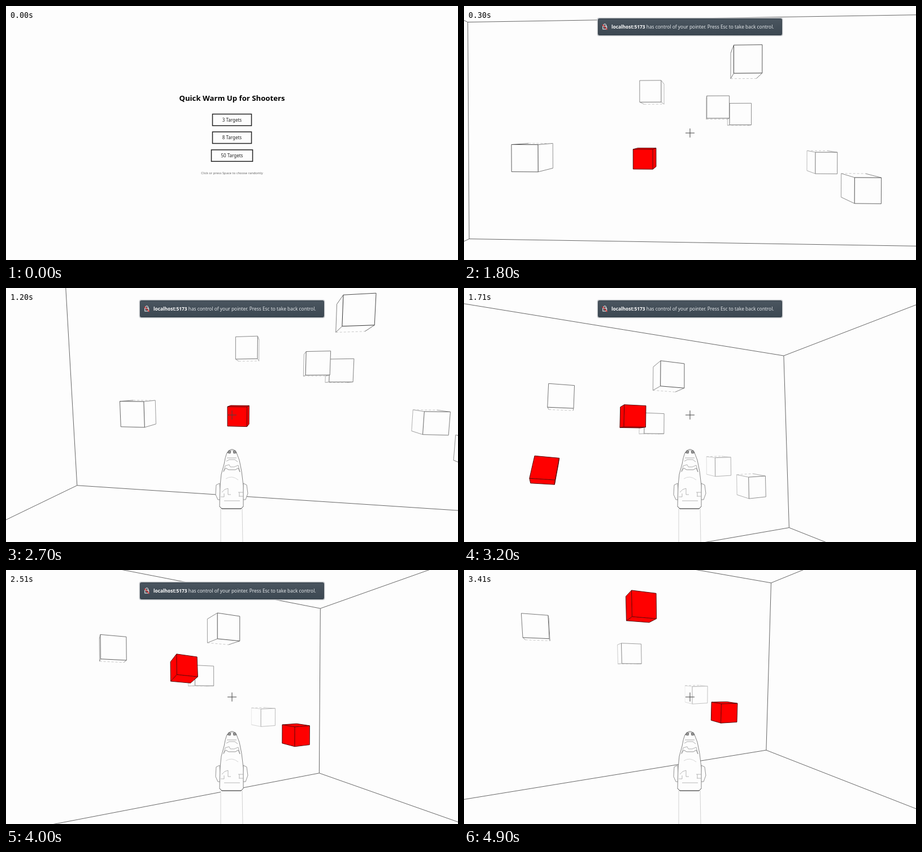
An HTML page with a canvas that plays this animation: 800x450 px, repeating every 5000 ms.

```html
<!DOCTYPE html>
<html lang="en">
<head>
<meta charset="utf-8">
<title>Quick Warm Up for Shooters</title>
<style>
  html, body { margin: 0; width: 100%; height: 100%; overflow: hidden; background: #fdfdfd; }
  canvas, svg { position: absolute; left: 0; top: 0; width: 800px; height: 450px; }
  text { font-family: "Noto Sans", "Open Sans", sans-serif; }
  #clock { font: 13.3px "DejaVu Sans Mono", monospace; }
  #menu { text-anchor: middle; font-size: 8px; fill: #222; }
  #menu rect { fill: none; stroke: #222; stroke-width: 1.5; }
  #menu .title { font-size: 13.2px; font-weight: 700; fill: #000; }
  #menu .hint { font-size: 5.82px; fill: #666; }
  #notice text { font-size: 8.37px; fill: #e4e8eb; }
</style>
</head>
<body>
<canvas id="scene" width="800" height="450"></canvas>
<svg viewBox="0 0 800 450">
  <defs>
    <linearGradient id="slate" x2="0" y2="1">
      <stop offset="0" stop-color="#4a555f"/><stop offset="1" stop-color="#3c4852"/>
    </linearGradient>
  </defs>
  <g id="menu">
    <text class="title" x="400" y="168">Quick Warm Up for Shooters</text>
    <rect x="365.5" y="191.5" width="69" height="20.5"/><text x="400" y="204.7">3 Targets</text>
    <rect x="365.5" y="223" width="69" height="20.5"/><text x="400" y="236.4">8 Targets</text>
    <rect x="363.5" y="254.8" width="73" height="20.5"/><text x="400" y="268.1">50 Targets</text>
    <text class="hint" x="400" y="298">Click or press Space to choose randomly</text>
  </g>
  <g id="notice">
    <rect x="235.5" y="20.5" width="329" height="33" rx="4" fill="#c9cccf"/>
    <rect x="237.5" y="22.5" width="325" height="29" rx="2" fill="url(#slate)" stroke="#36414a"/>
    <g fill="none" stroke="#fff">
      <path d="M247 36v-2a2.2 2.2 0 0 1 4.4 0v2"/><rect x="245.8" y="36" width="6.8" height="5"/>
      <path d="M245 33l8.5 9" stroke="#e33" stroke-width="1.3"/>
    </g>
    <text x="261" y="40"><tspan font-weight="700" fill="#fff">localhost:5173</tspan> has control of your pointer. Press Esc to take back control.</text>
  </g>
  <text id="clock" x="8" y="21">0.00s</text>
</svg>
<script>
const LOOP = 5000, START = 1500, STEP = 100;
const FOCAL = 482.5;
const ROOM = { left: -17.6, right: 17.2, h: 8.228, back: 20, near: -30 };
const $ = id => document.getElementById(id);
const ctx = $('scene').getContext('2d');

// time, x, z, yaw in degrees, pitch in radians
const CAMERA = [
  [1500, 0, 0, 0, 0],
  [1700, 0, 0, -1.2, -.004],
  [2000, 0, 0, -4.4, -.016],
  [2200, 0, 0, -5.05, -.018],
  [2600, -.6, 0, -9, -.075],
  [2800, -1.2, 0, -7.1, -.1],
  [3200, -2.05, -.17, 24.27, .089],
  [3600, -3.7, .5, 19.85, .0855],
  [3800, -3.7, .4, 22, .072],
  [4100, -3.1, -.1, 31, -.07],
  [4400, -2.3, -.6, 37.45, -.187],
  [4900, -1.5, -1.1, 25.55, -.102]
];

// front face centre; red from `on`, spinning from `hit`
const CUBES = [
  { p: [1.672, 2.546, 9.75], on: 4700 },
  { p: [-2.324, 1.83, 12.53] },
  { p: [.771, 1.062, 12.2], on: 2800, hit: 3700, tilt: .3, roll: -.8 },
  { p: [1.836, .776, 12.7] },
  { p: [-6.451, -1.005, 9.75] },
  { p: [-2.903, -1.43, 13.6], on: 0, hit: 2800, tilt: .36, roll: -.8 },
  { p: [5.821, -1.494, 12.87] },
  { p: [6.409, -2.295, 10.7], on: 3700, hit: 4700, tilt: .03, roll: -.8 }
];
const SPIN_LIFE = 1100;

// vertex bits: 1 = right, 2 = top, 4 = far
const FACES = [[0,1,3,2], [4,6,7,5], [0,2,6,4], [1,5,7,3], [0,4,5,1], [2,3,7,6]];

function cameraAt(t) {
  let i = 0;
  while (i < CAMERA.length - 2 && t >= CAMERA[i + 1][0]) i++;
  const a = CAMERA[i], b = CAMERA[i + 1], span = b[0] - a[0];
  const s = Math.min(1, (t - a[0]) / span);
  const slope = (j, k) => {
    const q = CAMERA[Math.max(0, j - 1)], r = CAMERA[Math.min(CAMERA.length - 1, j + 1)];
    return (r[k] - q[k]) / (r[0] - q[0]) * span;
  };
  const [x, z, yaw, pitch] = [1, 2, 3, 4].map(k => {
    const s2 = s * s, s3 = s2 * s;
    return a[k] * (2 * s3 - 3 * s2 + 1) + slope(i, k) * (s3 - 2 * s2 + s)
      + b[k] * (3 * s2 - 2 * s3) + slope(i + 1, k) * (s3 - s2);
  });
  const r = yaw * Math.PI / 180;
  return { x, z, sy: Math.sin(r), cy: Math.cos(r), sp: Math.sin(pitch), cp: Math.cos(pitch) };
}

function toView(c, [x, y, z]) {
  const dx = x - c.x, dz = z - c.z;
  const far = dx * c.sy + dz * c.cy;
  return [dx * c.cy - dz * c.sy, y * c.cp - far * c.sp, far * c.cp + y * c.sp];
}

const toScreen = ([x, y, z]) => [400 + FOCAL * x / z, 225 - FOCAL * y / z];

function trace(points, close) {
  ctx.beginPath();
  points.forEach(([x, y], i) => i ? ctx.lineTo(x, y) : ctx.moveTo(x, y));
  if (close) ctx.closePath();
}

function stroke(color, width = 1, dash = []) {
  ctx.strokeStyle = color;
  ctx.lineWidth = width;
  ctx.setLineDash(dash);
  ctx.stroke();
}

function line3d(c, p, q) {
  let a = toView(c, p), b = toView(c, q);
  const near = .05;
  if (a[2] < near && b[2] < near) return;
  if (a[2] < b[2]) [a, b] = [b, a];
  if (b[2] < near) {
    const s = (a[2] - near) / (a[2] - b[2]);
    b = a.map((v, i) => v + (b[i] - v) * s);
  }
  trace([toScreen(a), toScreen(b)]);
  stroke('#555', .9);
}

function drawRoom(c) {
  const { left, right, h, back, near } = ROOM;
  for (const y of [-h, h]) {
    line3d(c, [left, y, back], [right, y, back]);
    for (const x of [left, right]) line3d(c, [x, y, back], [x, y, near]);
  }
  for (const x of [left, right]) line3d(c, [x, -h, back], [x, h, back]);
}

function drawCube(c, cube, t) {
  const age = cube.hit && t >= cube.hit ? (t - cube.hit) / 1000 : 0;
  if (age * 1000 >= SPIN_LIFE) return;
  const red = t >= cube.on;
  const rx = age && cube.tilt * (1 - Math.exp(-8 * age)), rz = age && cube.roll * age * age;
  const view = [];
  for (let i = 0; i < 8; i++) {
    const x = (i & 1) - .5, y = (i >> 1 & 1) - .5, z = (i >> 2) - .5;
    const y1 = y * Math.cos(rx) - z * Math.sin(rx), z1 = y * Math.sin(rx) + z * Math.cos(rx);
    view.push(toView(c, [
      cube.p[0] + x * Math.cos(rz) - y1 * Math.sin(rz),
      cube.p[1] + x * Math.sin(rz) + y1 * Math.cos(rz),
      cube.p[2] + .5 + z1
    ]));
  }
  if (view.some(v => v[2] < .1)) return;
  const pts = view.map(toScreen), edges = new Map();
  FACES.forEach(face => {
    const q = face.map(i => pts[i]);
    const area = q.reduce((sum, [x, y], i) => {
      const [x2, y2] = q[(i + 1) % 4];
      return sum + x * y2 - x2 * y;
    }, 0);
    if (area >= 0) return;
    trace(q, true);
    ctx.fillStyle = !red ? '#fdfdfd' : age > .5 ? '#f92020' : '#ff0000';
    ctx.fill();
    face.forEach((a, i) => {
      const b = face[(i + 1) % 4], key = Math.min(a, b) * 8 + Math.max(a, b);
      edges.set(key, (edges.get(key) || 0) + 1);
    });
  });
  // outlines pale with distance
  const tone = Math.max(30, 30 + (view[0][2] - 9) * 20);
  const gray = add => `rgb(${[0, 0, 0].fill(Math.round(tone + add))})`;
  edges.forEach((count, key) => {
    const a = key >> 3, b = key & 7;
    trace([pts[a], pts[b]]);
    if (red) stroke('#400', .9);
    else if (!(a & 4) && !(b & 4)) stroke(gray(count > 1 ? 0 : 25), .9);
    else if ((a ^ b) === 4) stroke(gray(45), .8);
    else if ((a ^ b) === 2) stroke(gray(70), .8);
    else stroke('#bbb', .8, [4, 3]);
  });
}

function shape(d, color, width = .9, fill) {
  const path = new Path2D(d);
  if (fill) { ctx.fillStyle = fill; ctx.fill(path); }
  ctx.strokeStyle = color;
  ctx.lineWidth = width;
  ctx.setLineDash([]);
  ctx.stroke(path);
}

function gunSide() {
  shape('M664 290Q674 286 683 288L690 291L737 300L774 307L960 350V460H765L763 450L758 420L750 408L735 396L712 387L704 372L703 352L690 342L672 330L671 321L662 318Q658 303 664 290Z', '#333', .9, '#fdfdfd');
  shape('M668 290Q662 300 665 318M673 289L672 293L690 294M674 332L692 343L704 349', '#333', 1.2);
  shape('M716 333L717 342L726 345M728 337L727 346L756 354M734 355L736 365L730 383L723 378M748 365L742 378L736 386M704 372Q710 382 716 388', '#555');
  shape('M748 348L757 353L748 352ZM673 324L676 326L673 328Z', '#111', .8, '#111');
  shape('M772 355Q785 364 784 375Q783 390 779 402M697 304L762 318M731 340L766 349', '#bbb');
  for (let i = 0; i < 6; i++) {
    shape(`M${677 + i * 3.6} ${308 + i * .6}l3 14`, '#444');
    shape(`M${774 + i * 4.8} ${319 + i}l3 23`, '#777', .8);
  }
}

function gunRear() {
  shape('M380 391V451H419L418 391Z', '#ccc', .9, '#fdfdfd');
  shape('M378 346L372 349L371 366L375 375H381ZM420 346L426 349L428 364L424 375H419Z', '#888', .9, '#fdfdfd');
  shape('M391 292Q388 299 386 312L381 330L379 350L378 387L382 391H416L420 387V350L417 325L413 305L408 292L404 287H396Z', '#777', .9, '#fdfdfd');
  shape('M392 292L394 288L398 289L397 293ZM408 292L406 288L402 289L403 293Z', '#444', .7, '#999');
  shape('M396 287Q400 284 404 287', '#999', .8);
  shape('M390 307L395 304H405L410 308M391 301H408M388 315L395 313L397 317H404L411 314L414 326M388 315L385 326', '#999', .8);
  shape('M389 338Q400 331 411 340', '#ccc', .8);
  shape('M385 325L389 319L394 322H406L411 319L414 326', '#777', .8);
  shape('M382 362L387 357L393 355V366H398M380 370H386V364M411 362H420M412 369H420M413 362V369M386 377H414', '#999', .7);
  shape('M378 387L382 391H416L420 387', '#444', .9);
}

function drawGun(t) {
  if (t < 2100) return;
  ctx.save();
  if (t < 2300) {
    ctx.translate(t < 2200 ? 100 : 0, t < 2200 ? 20 : 0);
    gunSide();
  } else {
    const k = Math.max(0, (2500 - t) / 200);
    ctx.translate(45 * k * k, 20 * k * k);
    gunRear();
  }
  ctx.restore();
}

function drawCrosshair() {
  trace([[392, 225], [408, 225]]);
  stroke('#444');
  trace([[400, 217], [400, 233]]);
  stroke('#444');
}

function render(now) {
  const t = Math.floor(now % LOOP / STEP) * STEP;
  const playing = t >= START;
  $('menu').style.display = playing ? 'none' : '';
  $('notice').style.display = t >= 1700 && t < 4600 ? '' : 'none';
  $('clock').textContent = (Math.max(0, t - START) * 1.0035 / 1000).toFixed(2) + 's';
  ctx.fillStyle = '#fdfdfd';
  ctx.fillRect(0, 0, 800, 450);
  if (!playing) return;
  const cam = cameraAt(t);
  drawRoom(cam);
  [...CUBES].sort((a, b) => b.p[2] - a.p[2]).forEach(cube => drawCube(cam, cube, t));
  drawGun(t);
  drawCrosshair();
}

const begin = performance.now();
function tick() {
  render(performance.now() - begin);
  requestAnimationFrame(tick);
}
tick();
</script>
</body>
</html>
```
